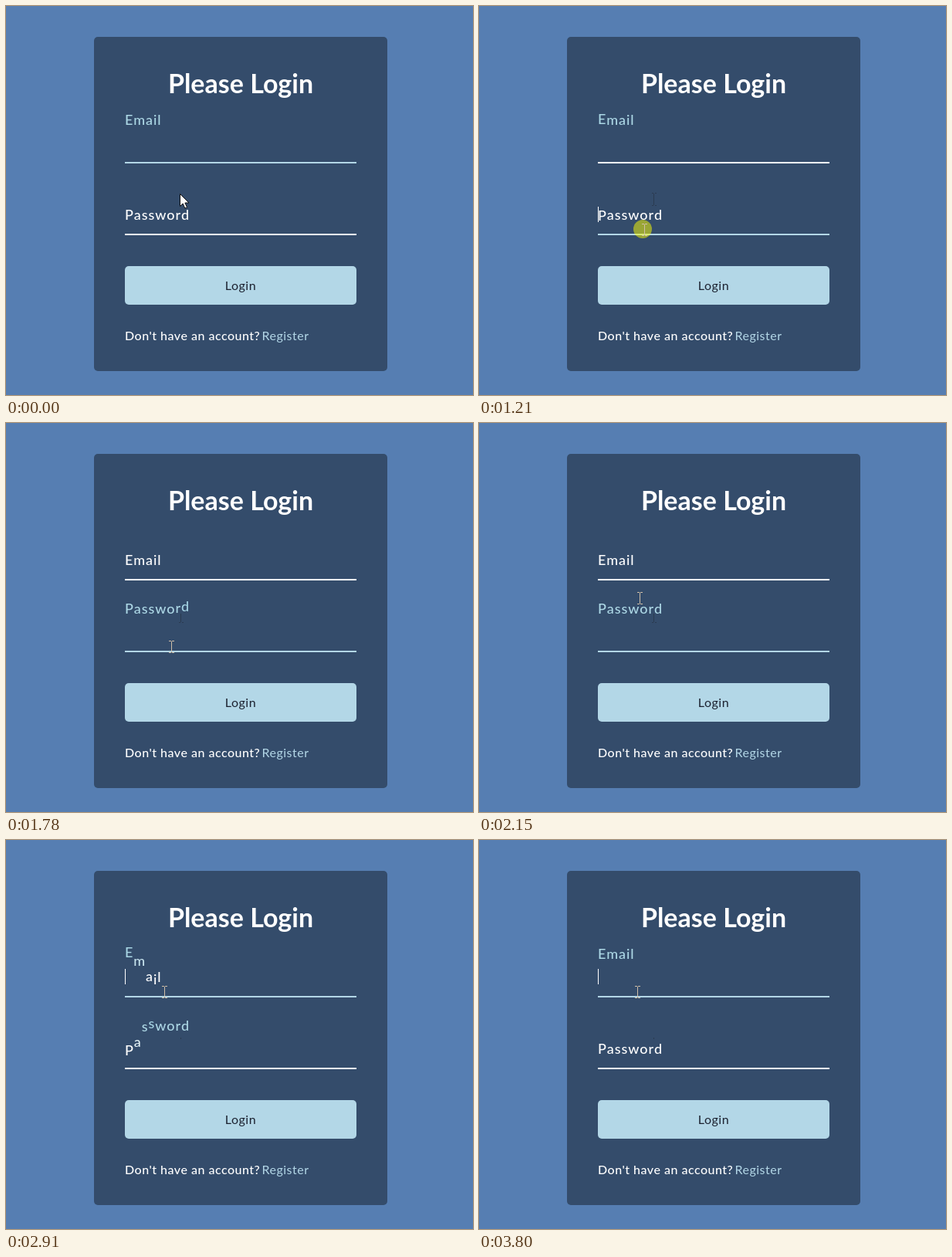
An HTML page for the animation above (4050 ms loop, 605 by 504 pixels).

```html
<!DOCTYPE html>
<html lang="en">
<head>
<meta charset="utf-8">
<title>Login form</title>
<style>
  html, body { margin: 0; width: 100%; height: 100%; overflow: hidden; background: #567eb2; }
  svg { display: block; font-family: Lato, "Open Sans", sans-serif; }
  text { fill: #fff; white-space: pre; }
  .title { font-size: 34px; font-weight: 700; text-anchor: middle; }
  .label { font-size: 18px; font-weight: 500; letter-spacing: .9px; }
  .small { font-size: 16px; letter-spacing: .5px; }
  .tip { font: 11.5px "Open Sans", "Noto Sans", sans-serif; fill: #575757; }
</style>
</head>
<body>
<svg width="605" height="504" viewBox="0 0 605 504">
  <rect width="605" height="504" fill="#567eb2"/>
  <rect x="114" y="40" width="380" height="433" rx="5" fill="#344c6b"/>
  <text class="title" x="304" y="113">Please Login</text>

  <rect id="emailLine" x="154" y="202" width="300" height="2"/>
  <rect id="passLine" x="154" y="295" width="300" height="2"/>
  <text class="label" id="email" x="154"></text>
  <text class="label" id="pass" x="154"></text>
  <rect id="caret" x="154" width="1" height="20" fill="#fff"/>

  <rect x="154" y="337" width="300" height="50" rx="5" fill="#b3d7e7"/>
  <text class="small" x="304" y="368" text-anchor="middle" style="fill:#1c2230">Login</text>
  <text class="small" x="154" y="433" font-weight="500">Don't have an account?</text>
  <text class="small" x="331.5" y="433" style="fill:#b3d7e7">Register</text>

  <g id="trace" fill="#2b3a50" shape-rendering="crispEdges">
    <path id="traceTop" d="M224 242h2v1h-2zM228 242h2v1h-2zM226 243h1v4h-1z"/>
    <path id="traceStem" d="M226 247h1v9h-1zM224 258h2v1h-2zM228 258h2v1h-2z"/>
    <path d="M226 256h1v2h-1z"/>
  </g>
  <circle id="click" r="12" fill="#ff0" fill-opacity=".5"/>
  <path id="arrow" transform="translate(225.5 243)" fill="#fff" stroke="#111" stroke-width="1"
        d="M0 .5V16.5L3.7 13L6.3 19L9 17.8L6.4 12H11.5Z"/>
  <path id="beam" fill="#d0bfa8" shape-rendering="crispEdges"
        d="M-3 -8h3v1h-3zM1 -8h3v1h-3zM0 -7h1v14h-1zM-3 7h3v1h-3zM1 7h3v1h-3z"/>
  <g id="tip">
    <rect x=".5" y=".5" width="129" height="23" fill="#fff" stroke="#767676"/>
    <text class="tip" x="7" y="16">Completa este campo</text>
  </g>
</svg>
<script>
const LOOP = 4050, TO_PASS = 1197, TO_EMAIL = 2705;
const REST = [255, 255, 255], ACTIVE = [173, 216, 230];
const STARTS = [0, 360, 820, 1210, 1730, 2350, 2460, 2710, 3190];
const $ = id => document.getElementById(id);
const clamp = v => Math.min(1, Math.max(0, v));
const within = (t, a, b) => t >= a && t < b;
const show = (id, on) => $(id).setAttribute('visibility', on ? 'visible' : 'hidden');
const move = (id, x, y) => $(id).setAttribute('transform', `translate(${x} ${y})`);

function bezier(a, b, s) {
  const r = 1 - s;
  return 3 * a * s * r * r + 3 * b * s * s * r + s * s * s;
}

// cubic-bezier(.68, -.55, .265, 1.55)
function backEase(x) {
  if (x <= 0 || x >= 1) return clamp(x);
  let lo = 0, hi = 1;
  for (let i = 0; i < 24; i++) {
    const mid = (lo + hi) / 2;
    if (bezier(.68, .265, mid) < x) lo = mid; else hi = mid;
  }
  return bezier(-.55, 1.55, lo);
}

function split(id, word) {
  return [...word].map(ch => {
    const span = document.createElementNS('http://www.w3.org/2000/svg', 'tspan');
    span.textContent = ch;
    $(id).appendChild(span);
    return span;
  });
}

function wave(letters, base, t, startsUp) {
  letters.forEach((span, i) => {
    const at = start => backEase((t - start - 50 * i) / 300);
    const swap = at(TO_PASS) - at(TO_EMAIL);
    const lift = startsUp ? 1 - swap : swap;
    const rgb = REST.map((c, k) => Math.round(Math.min(255, c + (ACTIVE[k] - c) * lift)));
    span.setAttribute('y', (base - 30 * lift).toFixed(2));
    span.style.fill = `rgb(${rgb})`;
  });
}

function pointer(t) {
  const ease = k => k * k * (3 - 2 * k);
  const a = ease(clamp((t - 360) / 340)), b = ease(clamp((t - 1800) / 530));
  return [Math.round(226 - 12 * a - 9 * b), Math.round(250 + 40 * a - 93 * b)];
}

const email = split('email', 'Email'), pass = split('pass', 'Password');

function draw(now) {
  const time = now % LOOP;
  const start = STARTS.filter(s => s <= time).pop();
  const t = start + 50 * Math.floor((time - start) / 50);
  const onPass = within(t, TO_PASS, TO_EMAIL);

  wave(email, 184, t, true);
  wave(pass, 277, t, false);
  $('emailLine').setAttribute('fill', onPass ? '#fff' : '#b3d7e7');
  $('passLine').setAttribute('fill', onPass ? '#b3d7e7' : '#fff');

  $('caret').setAttribute('y', onPass ? 260 : 167);
  show('caret', within(t, 360, 870) || within(t, 1210, 1730) || within(t, 2250, 3240) || time >= 3800);

  const [x, y] = pointer(t);
  show('arrow', t < 360);
  show('beam', t >= 360);
  move('beam', x, y);
  show('trace', t >= 410);
  show('traceTop', within(t, 410, 1700));
  show('traceStem', within(t, 410, 2350));

  show('click', within(t, 1210, 1330) || within(t, 2710, 2830));
  move('click', x - 2, y - 1);

  const first = within(t, 820, 1210), second = within(t, 2460, 2710);
  show('tip', first || second);
  move('tip', x + 9, y + 15);
  $('tip').setAttribute('opacity', t < (first ? 870 : 2510) ? .5 : 1);
}

const began = performance.now();
function tick() {
  draw(performance.now() - began);
  requestAnimationFrame(tick);
}
tick();
</script>
</body>
</html>
```
